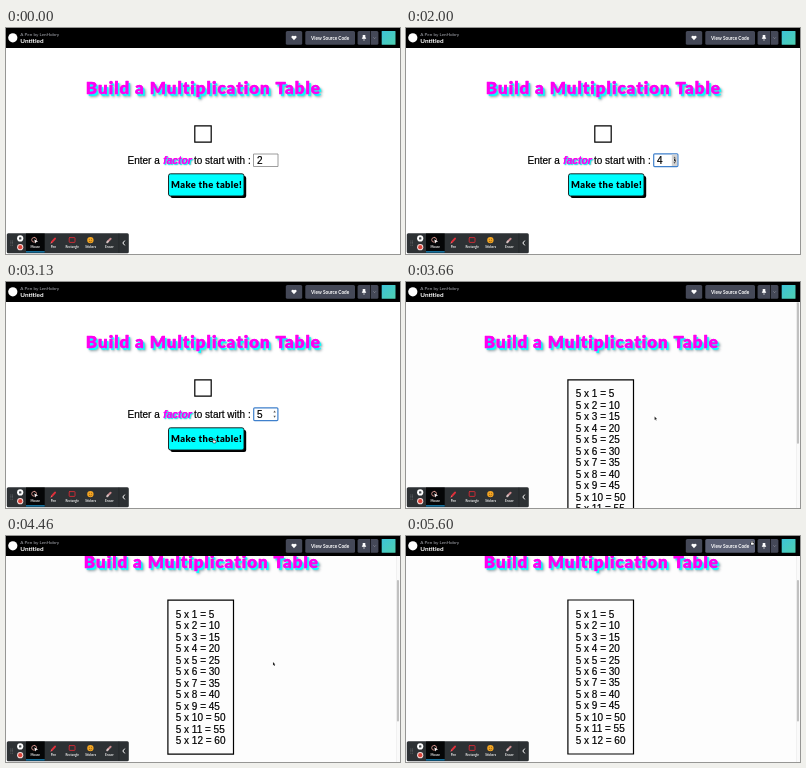
These frames come from a looping animation (394x226 px, 5.66 s). An HTML page with a canvas:

```html
<!DOCTYPE html>
<html lang="en">
<head>
<meta charset="utf-8">
<title>Multiplication table</title>
<style>
html, body { margin: 0; width: 100%; height: 100%; overflow: hidden; background: #fff; }
canvas { display: block; width: 394px; height: 226px; }
</style>
</head>
<body>
<canvas id="stage"></canvas>
<script>
const W = 394, H = 226, LOOP = 5660, START = 1260, STEP = 1000 / 15;
const TABLE_AT = 3240, SCROLL_FROM = 3800, SCROLL_TIME = 700, SCROLL_MAX = 33.8;
const SANS = '"Liberation Sans", Arial, sans-serif';
const UI = 'Lato, "Open Sans", sans-serif';
const MAGENTA = '#ff00f0', CYAN = '#00ffff';

const canvas = document.getElementById('stage');
const scale = window.devicePixelRatio || 1;
canvas.width = W * scale;
canvas.height = H * scale;
const c = canvas.getContext('2d');

// time, x, y
const path = [
  [1260, 268, 130], [2300, 268, 130], [2660, 229, 144], [2950, 208, 157],
  [3260, 208, 157], [3660, 248.6, 134.6], [4130, 266, 127], [4500, 267, 126],
  [5000, 290.2, 79.4], [5600, 346, 5]
];

function cursorAt(t) {
  let i = 0;
  while (i < path.length - 2 && t >= path[i + 1][0]) i++;
  const [t0, x0, y0] = path[i], [t1, x1, y1] = path[i + 1];
  let u = Math.min(1, Math.max(0, (t - t0) / (t1 - t0)));
  u = u * u * (3 - 2 * u);
  return [x0 + (x1 - x0) * u, y0 + (y1 - y0) * u];
}

function scrollAt(t) {
  const u = Math.min(1, Math.max(0, (t - SCROLL_FROM) / SCROLL_TIME));
  return SCROLL_MAX * (1 - (1 - u) ** 2);
}

function rect(x, y, w, h, fill, r = 0) {
  c.fillStyle = fill;
  c.beginPath();
  c.roundRect(x, y, w, h, r);
  c.fill();
}

function frame(x, y, w, h, color, width, r = 0) {
  c.strokeStyle = color;
  c.lineWidth = width;
  c.beginPath();
  c.roundRect(x, y, w, h, r);
  c.stroke();
}

function disc(x, y, r, fill) {
  c.fillStyle = fill;
  c.beginPath();
  c.arc(x, y, r, 0, Math.PI * 2);
  c.fill();
}

function line(points, color, width) {
  c.strokeStyle = color;
  c.lineWidth = width;
  c.beginPath();
  points.forEach(([x, y]) => c.lineTo(x, y));
  c.stroke();
}

function poly(points, fill) {
  c.fillStyle = fill;
  c.beginPath();
  points.forEach(([x, y]) => c.lineTo(x, y));
  c.closePath();
  c.fill();
}

function text(s, x, y, font, fill, align = 'left') {
  c.font = font;
  c.fillStyle = fill;
  c.textAlign = align;
  c.fillText(s, x, y);
}

// Body copy, a touch heavier than the plain font
function body(s, x, y) {
  text(s, x, y, `10px ${SANS}`, '#000');
  c.strokeStyle = '#000';
  c.lineWidth = 0.2;
  c.strokeText(s, x, y);
}

// Rounded heavy lettering over a soft grey and a cyan shadow
function fancy(s, x, y, font, offset, weight, align) {
  c.save();
  c.lineJoin = 'round';
  c.lineWidth = weight;
  c.strokeStyle = MAGENTA;
  const layer = (color, shift, blur) => {
    c.shadowColor = color;
    c.shadowOffsetX = c.shadowOffsetY = shift * scale;
    c.shadowBlur = blur * scale;
    text(s, x, y, font, MAGENTA, align);
  };
  layer('rgba(60, 80, 90, 0.6)', offset * 1.5, offset * 1.6);
  layer(CYAN, offset, 0.8);
  c.shadowColor = 'transparent';
  c.strokeText(s, x, y);
  c.restore();
}

function title(cx, y) {
  c.save();
  c.letterSpacing = '0.95px';
  fancy('Build a Multiplication Table', cx, y, `900 17px ${UI}`, 1.7, 0.3, 'center');
  c.restore();
}

function spinner(hover) {
  if (hover) rect(265.8, 126.5, 5.4, 11.5, '#d2d2d2');
  poly([[267.4, 130.6], [269.8, 130.6], [268.6, 128.6]], '#555');
  poly([[267.4, 133.8], [269.8, 133.8], [268.6, 135.8]], '#555');
}

function form(t) {
  const active = t >= START;
  const focused = t >= 1500;
  title(197.4, 66);
  frame(188.8, 97.8, 16.4, 16.4, '#000', 1.2);
  body('Enter a', 121.5, 135.8);
  fancy('factor', 157.2, 135.8, `italic bold 10.3px ${SANS}`, 0.9, 0.15);
  body('to start with :', 188, 135.8);
  rect(247.5, 126, 24.5, 12.5, '#fff');
  if (focused) frame(247.7, 125.8, 24.2, 12.8, '#3f80cc', 1.2, 1);
  else frame(247.5, 126, 24.5, 12.5, '#858585', 0.8);
  const value = 2 + [1530, 1800, 2060].filter(at => t >= at).length;
  body(value, 251, 135.8);
  if (active) spinner(t < 2350);

  rect(164.5, 148, 75.7, 22, '#000', 2);
  rect(162.5, 145.8, 75.5, 22.2, CYAN, 2);
  frame(162.5, 145.8, 75.5, 22.2, '#111', 0.9, 2);
  c.save();
  c.letterSpacing = '0.35px';
  text('Make the table!', 200.5, 160.2, `900 9.3px ${UI}`, '#000', 'center');
  c.restore();
}

function table(scroll) {
  title(195.4, 66 - scroll);
  frame(161.9, 97.8 - scroll, 65.6, 154, '#000', 1.2);
  for (let n = 1; n <= 12; n++)
    body(`5 x ${n} = ${5 * n}`, 169.7, 115.4 + (n - 1) * 11.48 - scroll);

  rect(390, 20, 4, 206, '#fafafa');
  rect(390, 20, 0.4, 206, '#e4e4e4');
  rect(390.9, 20.3 + scroll * 0.7, 2.1, 141.5, '#c1c1c1', 1);
}

function header(hover) {
  rect(0, 0, W, 20, '#000');
  disc(6.8, 9.8, 4.6, '#fff');
  text('A Pen by LenHobry', 14.3, 8, `4.6px ${UI}`, '#a9abb3');
  text('Untitled', 14.3, 15.3, `bold 6.4px ${UI}`, '#fff');

  const gray = '#444857';
  rect(279.8, 3, 16.4, 13.8, gray, 1.5);
  rect(299.3, 3, 49.7, 13.8, hover ? '#5a5f73' : gray, 1.5);
  rect(351.6, 3, 12.6, 13.8, gray, [1.5, 0, 0, 1.5]);
  rect(364.8, 3, 7.6, 13.8, gray, [0, 1.5, 1.5, 0]);
  disc(286.8, 9, 1.35, '#fff');
  disc(289.2, 9, 1.35, '#fff');
  poly([[285.6, 9.5], [290.4, 9.5], [288, 12.2]], '#fff');
  text('View Source Code', 324.2, 11.6, `bold 4.7px ${UI}`, '#fff', 'center');
  rect(356.7, 7, 2.6, 3.2, '#fff', 0.5);
  rect(355.9, 9.6, 4.2, 1.1, '#fff', 0.5);
  rect(357.7, 10.5, 0.6, 2.4, '#fff');
  line([[367.4, 9.4], [368.6, 10.6], [369.8, 9.4]], '#9a9ca6', 0.6);

  const tone = c.createLinearGradient(375.7, 3, 389.5, 16.8);
  tone.addColorStop(0, '#3cc3d8');
  tone.addColorStop(1, '#4fd0b0');
  rect(375.7, 3, 13.8, 13.8, tone, 0.6);
}

function toolbar() {
  rect(0.8, 205.3, 122, 19.9, '#2d3134', 1.5);
  for (let i = 0; i < 8; i++)
    disc(4.9 + (i % 2) * 1.5, 213 + (i >> 1) * 1.4, 0.4, '#8d9194');
  disc(14.2, 210.4, 3.1, '#fff');
  rect(13, 209.2, 2.4, 2.4, '#4a4e52', 0.6);
  disc(14.2, 219.2, 3.1, '#f3d9d7');
  disc(14.2, 219.2, 2.1, '#d9433a');

  rect(20, 205.5, 18.7, 19.5, '#050607');
  rect(20, 223.3, 18.7, 1.2, '#1c9bd8');
  c.lineCap = 'round';
  frame(25.7, 209.4, 4.8, 4.8, '#f0a59c', 0.8, 2.4);
  poly([[28.2, 211.4], [32.2, 213.4], [30.4, 213.8], [29.6, 215.6]], '#fff');

  line([[45.8, 214.2], [49, 210.6]], '#e0303a', 2);
  line([[44.8, 215.2], [45.4, 214.6]], '#ff8087', 0.8);
  frame(63.2, 209.6, 5.8, 4.8, '#d82c36', 0.9, 0.5);
  disc(84.4, 212.1, 3.2, '#f5a623');
  disc(83.2, 211.3, 0.45, '#5f3b08');
  disc(85.6, 211.3, 0.45, '#5f3b08');
  line([[83, 213.2], [84.4, 213.9], [85.8, 213.2]], '#5f3b08', 0.5);
  line([[102, 213.4], [104.6, 210.8]], '#c98a8e', 2);
  line([[101.2, 214.2], [102, 213.4]], '#d8c4c4', 2);
  c.lineCap = 'butt';

  [['Mouse', 29.2], ['Pen', 47.4], ['Rectangle', 66.2], ['Stickers', 84.6], ['Eraser', 103.4]]
    .forEach(([s, x]) => text(s, x, 220.2, `bold 3.1px ${UI}`, '#eee', 'center'));
  rect(112.7, 205.5, 0.5, 19.5, '#1c1f21');
  line([[118.8, 212.6], [116.8, 215], [118.8, 217.4]], '#fff', 1);
}

function arrow(x, y) {
  const shape = [[0, 0], [0, 3.4], [0.8, 2.7], [1.4, 4], [2, 3.7], [1.4, 2.5], [2.4, 2.4]]
    .map(([dx, dy]) => [x + dx, y + dy]);
  line([...shape, shape[0]], '#fff', 0.6);
  poly(shape, '#222');
}

function hand(x, y) {
  rect(x - 0.8, y - 0.4, 1.6, 3.4, '#111', 0.8);
  rect(x - 1.5, y + 1.2, 3.8, 3.1, '#111', 1);
  rect(x - 0.4, y, 0.8, 3, '#fff', 0.4);
  rect(x - 1, y + 1.7, 2.8, 2.1, '#fff', 0.7);
}

function draw(ms) {
  let t = ms % LOOP;
  t = t < START ? 0 : START + Math.floor((t - START) / STEP + 0.06) * STEP;
  const [x, y] = cursorAt(t);
  const onForm = t < TABLE_AT;
  const overHeader = y < 16 && x > 299 && x < 349;
  const overButton = onForm && x < 238 && y > 146;

  c.setTransform(scale, 0, 0, scale, 0, 0);
  rect(0, 0, W, H, onForm ? '#fff' : '#fdfdfd');
  if (onForm) form(t);
  else table(scrollAt(t));
  header(overHeader);
  toolbar();
  if (t < START) return;
  if (overButton || overHeader) hand(x, y);
  else arrow(x, y);
}

const begin = performance.now();
function tick() {
  draw(performance.now() - begin);
  requestAnimationFrame(tick);
}
tick();
</script>
</body>
</html>
```
